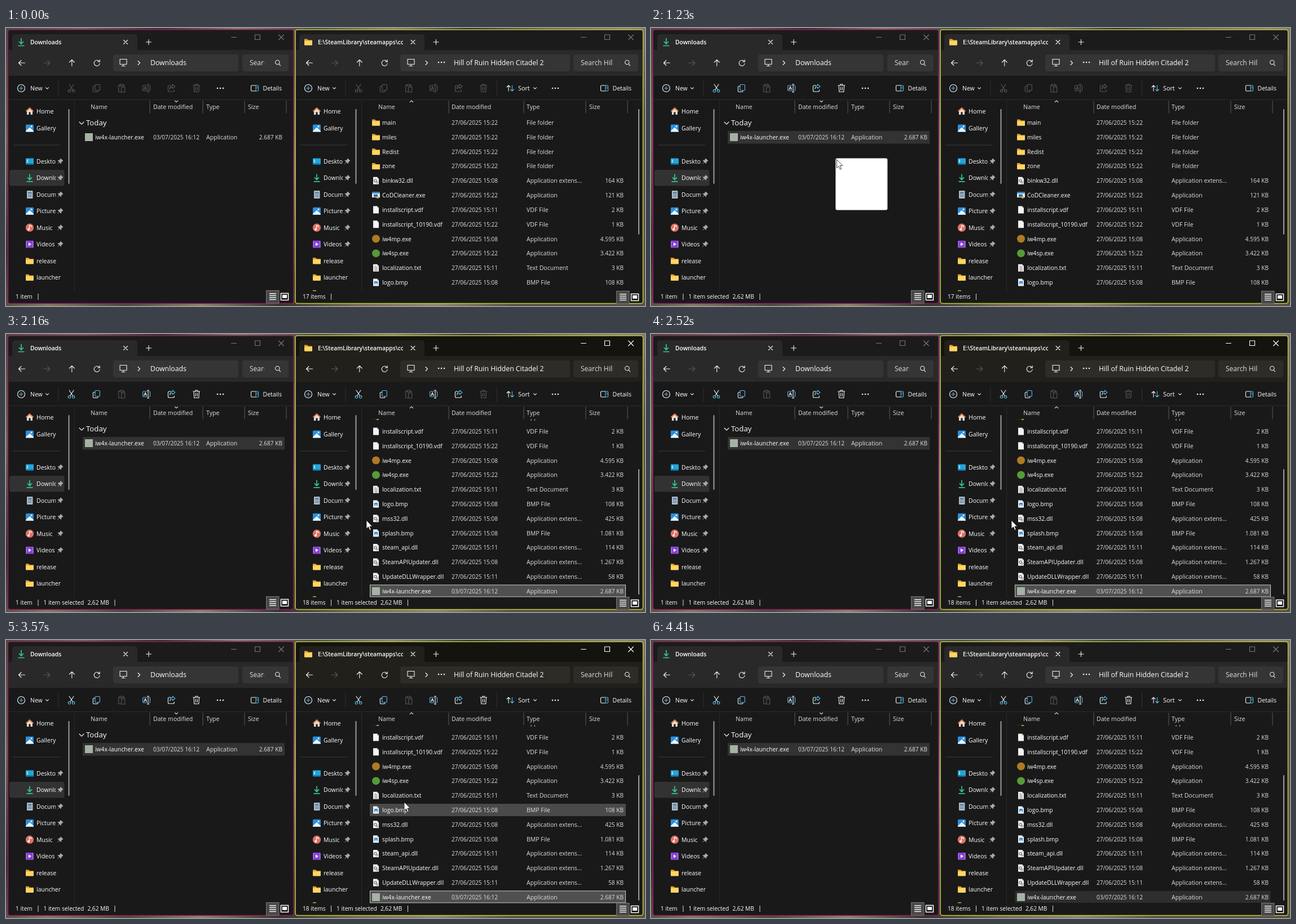
Recreate the animation shown at these times as an HTML page. Size 1133 by 494 pixels, loop 4.44 s.

```html
<!DOCTYPE html>
<html lang="en">
<head>
<meta charset="utf-8">
<title>Copying a file between folders</title>
<style>
html, body { margin: 0; width: 100%; height: 100%; overflow: hidden; background: #191919; }
svg { display: block; }
#stage { position: absolute; left: 0; top: 0; }
text { font-family: "Open Sans", "Noto Sans", sans-serif; fill: #fff; white-space: pre; }
.soft { fill: #dedede; }
.line { fill: none; stroke: #f4f4f4; stroke-width: 1.1; stroke-linecap: round; stroke-linejoin: round; }
.line .b { stroke: #58bdea; }
.off, .off .b { stroke: #56595b; }
.title { fill: #1c1b1b; }
.nav { fill: #2a2929; }
.caps { stroke: #777; }
.focused .title { fill: #15130d; }
.focused .nav { fill: #22201a; }
.focused .caps { stroke: #fff; }
</style>
</head>
<body>
<svg id="stage" width="1133" height="494" viewBox="0 0 1133 494"></svg>
<script>
const LOOP = 4440, DROP = 2010, BLUR = 4080, SCROLL = 150, ROW = 25.82;
const FOLDER = 'Hill of Ruin Hidden Citadel 2';
const stage = document.getElementById('stage');

// Drawing helpers
const text = (x, y, s, size = 10.5, attrs = '') =>
  `<text x="${x}" y="${y}" font-size="${size}" ${attrs}>${s}</text>`;
const soft = (x, y, s, size, attrs = '') => text(x, y, s, size, `class="soft" ${attrs}`);
const cropped = (x, y, s, size, w, attrs = '') =>
  `<svg x="${x}" y="${y - 14}" width="${w}" height="20">${text(0, 14, s, size, attrs)}</svg>`;
const rect = (x, y, w, h, fill, attrs = '') =>
  `<rect x="${x}" y="${y}" width="${w}" height="${h}" fill="${fill}" ${attrs}/>`;
const at = (x, y, body, attrs = '') => `<g transform="translate(${x} ${y})" ${attrs}>${body}</g>`;
const path = (d, attrs = '') => `<path d="${d}" ${attrs}/>`;
const line = (x, y, d, attrs = 'class="line"') => at(x, y, path(d), attrs);
const dots = (x, y) => [-5, 0, 5].map(d => `<circle cx="${x + d}" cy="${y}" r="1.3" fill="#eee"/>`).join('');

const glyph = {
  back: 'M5.5 0H-5.5M-1-4.5-5.5 0-1 4.5',
  forward: 'M-5.5 0H5.5M1-4.5 5.5 0 1 4.5',
  up: 'M0 5.5V-5.5M-4.5-1 0-5.5 4.5-1',
  refresh: 'M4.5-2A5 5 0 1 0 5 1M5-5.5V-2H1.5',
  pc: 'M-6-5.5H6V3.5H-6ZM-3 6.5H3M0 3.5V6.5',
  right: 'M-2-3.5 1.5 0-2 3.5',
  down: 'M-2.5-1.2 0 1.2 2.5-1.2',
  lens: 'M3.5-1A3.7 3.7 0 1 1-3.9-1 3.7 3.7 0 1 1 3.5-1M2.5 2 5 4.8',
  cross: 'M-3.5-3.5 3.5 3.5M3.5-3.5-3.5 3.5',
  plus: 'M-4.5 0H4.5M0-4.5V4.5'
};

const blue = d => path(d, 'class="b"');
const ring = (x, y, r) => `<circle class="b" cx="${x}" cy="${y}" r="${r}"/>`;
const tools = {
  cut: path('M-4-7 2.5 3M4-7-2.5 3') + ring(-3.6, 4.8, 2.2) + ring(3.6, 4.8, 2.2),
  copy: path('M-2.5-3.5H-4.5Q-6-3.5-6-2V5Q-6 6.5-4.5 6.5H1Q2.5 6.5 2.5 5V4') + blue('M-1-6.5H4.5Q6-6.5 6-5V2.5Q6 4 4.5 4H-1Q-2.5 4-2.5 2.5V-5Q-2.5-6.5-1-6.5Z'),
  paste: path('M-2.5-5.5H-5V6.5H-1M2.5-5.5H5V-3M-2.5-7H2.5V-4H-2.5Z') + blue('M0-2H6V7H0Z'),
  rename: blue('M1-5H-5Q-6.5-5-6.5-3.5V3Q-6.5 4.5-5 4.5H1M5 4.5Q6.5 4.5 6.5 3V-3.5Q6.5-5 5-5') + path('M3-7V7M1.5-7H4.5M1.5 7H4.5M-4.5 2.5-2-3 .5 2.5M-3.7 1H-.4'),
  share: path('M-1-5H-4Q-6-5-6-3V4Q-6 6-4 6H3Q5 6 5 4V3') + blue('M2-7 6.5-3.2 2 .5V-1.8Q-1.5-2-3 1.5-2.5-4.5 2-4.8Z'),
  trash: path('M-6-5H6M-4.8-5-4 6.5H4L4.8-5M-2-5V-7H2V-5M-1.5-2V3.5M1.5-2V3.5')
};
const tool = (id, name, x) => at(x, 107, tools[name], `class="line off" id="${id}${name}"`);

// Coloured icons, centred on the origin
const folderIcon = path('M-7-5.5H-2L0-3.5H7V5H-7Z', 'fill="#e2a32b"') + rect(-7, -2.5, 14, 8.3, '#ffd563', 'rx="1"');
const sheet = path('M-5-6.5H2L5-3.5V6.5H-5Z', 'fill="#f3f3f3"') + path('M2-6.5V-3.5H5Z', 'fill="#b9b9b9"');
const icons = {
  folder: folderIcon,
  page: sheet,
  lib: sheet + '<circle cx="-1" cy="0" r="2.2" fill="none" stroke="#777" stroke-width="1.3"/><circle cx="2" cy="3" r="1.6" fill="none" stroke="#777"/>',
  txt: sheet + path('M-3-3H1M-3-1H3M-3 1H3M-3 3H3M-3 5H3', 'stroke="#888" stroke-width=".9"'),
  bmp: sheet + rect(-3, -2, 6, 6, '#2f86d0') + path('M-3 4 0 0 3 4Z', 'fill="#bfe2fa"'),
  app: rect(-7, -5.5, 14, 9.5, '#e6eef5') + rect(-7, -5.5, 14, 2.5, '#3b87c8') + rect(-4, -1.5, 7, 4.5, '#2c6daa') + rect(1, 2, 4, 3.5, '#d8b53c'),
  amber: '<circle r="7" fill="#b07a24"/>',
  green: '<circle r="7" fill="#569a38"/>',
  launcher: rect(-7, -7, 14, 14, '#a5b2a5'),
  home: path('M-5-1V6H-1.5V1.5H1.5V6H5V-1L0-5Z', 'fill="#e3ddd8"') + path('M-6.5 0 0-6 6.5 0', 'fill="none" stroke="#e0733f" stroke-width="2"'),
  picture: rect(-7, -6.5, 14, 13, '#2b8fdb', 'rx="1.5"') + path('M-7 5 0-1.5 7 5V6.5H-7Z', 'fill="#e9f5ff"') + '<circle cx="3" cy="-3" r="1.4" fill="#fff"/>',
  desktop: rect(-7, -5.5, 14, 11, '#23a5d8', 'rx="1"') + rect(-5, -3, 2, 2, '#d5f4ff') + rect(-5, 0, 2, 2, '#d5f4ff') + rect(-7, 3.5, 14, 2, '#1476ad'),
  download: path('M0-7V3M-4-1 0 3.2 4-1M-5.5 6.5H5.5', 'fill="none" stroke="#35c596" stroke-width="1.7"'),
  doc: rect(-5, -7, 10.5, 14, '#a9bccb', 'rx="1"') + rect(-3, -4.5, 6.5, 3, '#5c7f9c') + path('M-3 1H3.5M-3 3.5H3.5', 'stroke="#4f6f8b"'),
  music: '<circle r="7.2" fill="#df7162"/>' + path('M-.5 3V-4L3-3V-1', 'fill="none" stroke="#fff" stroke-width="1.3"') + '<circle cx="-2" cy="3" r="1.9" fill="#fff"/>',
  video: rect(-7, -6.5, 14, 13, '#8543d0', 'rx="1.5"') + path('M-2-3 3 0-2 3Z', 'fill="#fff"') + path('M-5.5-5V5M5.5-5V5', 'stroke="#d6b7f7" stroke-dasharray="1.5 1.5"')
};
const icon = (name, x, y) => at(x, y, icons[name]);
const pin = y => at(96, y, path('M1-5 5-1 3.8-.5 1.8 1.5 1.5 4-4-1.5-1.5-1.8.5-3.8ZM-1 1-4.5 4.5', 'fill="#aaa" stroke="#aaa" stroke-width=".9"'));

function sidebar(selected) {
  const items = [['desktop', 'Desktop'], ['download', 'Downloads'], ['doc', 'Documents'], ['picture', 'Pictures'],
    ['music', 'Music'], ['video', 'Videos'], ['folder', 'release'], ['folder', 'launcher']];
  let out = selected ? rect(6, 252, 97.5, 28.5, '#323232', 'rx="3"') : '';
  out += icon('home', 42, 148) + text(54, 152, 'Home', 10.8) + icon('picture', 42, 178) + text(54, 182, 'Gallery');
  out += rect(13, 207.5, 83, 1, '#3d3d3d');
  items.forEach(([kind, label], i) => {
    const y = 237 + i * 29.45, pinned = i < 6;
    out += icon(kind, 42, y) + cropped(54, y + 4, label, 10.5, pinned ? 34.5 : 50) + (pinned ? pin(y) : '');
  });
  return out + rect(110.5, 144, 2, 133, '#9b9b9b', 'rx="1"') + rect(121, 128, 1, 340, '#292929');
}

function status(id, x, countWidth, count) {
  const s = x + countWidth + 10;
  return text(x, 481, count, 10.2, `id="${id}count"`) + rect(s, 472, 1, 11, '#ddd') +
    `<g id="${id}picked">${text(s + 10, 481, '1 item selected', 10.2)}${text(s + 88, 481, '2,62 MB', 10.2)}${rect(s + 136, 472, 1, 11, '#ddd')}</g>`;
}
const views = (x, y) => rect(x - 11.5, y - 11, 22.5, 22.5, '#484848', 'stroke="#777"') +
  at(x, y, path('M-6-5.5H6M-6-2H6M-6 1.5H6M-6 5H6', 'stroke="#f4f4f4" stroke-width="1.3"')) +
  at(x + 21, y, rect(-6.5, -6, 13, 12, '#111', 'stroke="#fff" stroke-width="1.5"') + rect(-4, -3.5, 8, 6, '#fff'));

function frame(id, w) {
  const { x, width, dx, border, tabX, tabW, addr, addrW, search, searchW, capX, detail } = w, nx = dx ? dx + 1 : 0;
  let out = rect(x, 3, width, 486.5, '#191919', `rx="4" stroke="${border}" stroke-width="1.6"`);
  out += rect(x + 1, 4, width - 2, 36, '', 'rx="3" class="title"') + rect(x + 1, 39, width - 2, 46, '', 'class="nav"');
  out += path(`M${tabX} 39V17Q${tabX} 11 ${tabX + 6} 11H${tabX + tabW - 6}Q${tabX + tabW} 11 ${tabX + tabW} 17V39Z`, 'class="nav"');
  out += line(w.closeX, 25, glyph.cross) + line(w.closeX + 41, 25, glyph.plus);
  out += at(capX, 16.5, path('M-4.5 0H4.5M37.5-4.5H46.5V4H37.5ZM79.5-4.5 88.5 4.5M88.5-4.5 79.5 4.5'), 'class="line caps"');
  out += ['back', 'forward', 'up', 'refresh'].map((n, i) =>
    line(nx + 28 + i * 44.4, 62, glyph[n], `class="line${i === 1 ? ' off' : ''}"`)).join('');
  const field = 'rx="4" fill-opacity=".055"';
  out += rect(addr, 47, addrW, 30, '#fff', field) + rect(search, 47, searchW, 30, '#fff', field);
  out += line(nx + 208, 61, glyph.pc) + line(nx + 236, 62, glyph.right) + line(search + searchW - 19.5, 62, glyph.lens);
  out += at(dx + 27, 107, '<circle r="6.5"/>' + blue('M-3.2 0H3.2M0-3.2V3.2'), 'class="line"');
  out += text(dx + 43, 111, 'New') + line(dx + 73, 107, glyph.down) + rect(dx + 92.5, 94, 1, 26, '#303030');
  out += Object.keys(tools).map((n, i) => tool(id, n, dx + 116 + i * 44.35)).join('');
  out += at(detail, 107, path('M1.5-5H-5Q-6.5-5-6.5-3.5V3.5Q-6.5 5-5 5H1.5') + blue('M2-5H5Q6.5-5 6.5-3.5V3.5Q6.5 5 5 5H2ZM3.8-2H4.8M3.8 0H4.8'), 'class="line"');
  out += text(detail + 14.5, 111, 'Details') + rect(x + 1, 127, width - 2, 1, '#2c2c2c');
  return `<g id="${id}">${out}${at(dx, 0, sidebar(!dx))}</g>`;
}
const columns = (labels, rules) =>
  labels.map(([x, s]) => soft(x, 144, s, 10.6)).join('') +
  rules.map(x => rect(x, 129, 1, 22.5, '#5a5a5a')).join('');

// Right-hand list
const LIB = 'Application extens...', APP = 'Application', DIR = 'File folder', VDF = 'VDF File';
const files = [
  ['folder', 'main', 22, DIR], ['folder', 'miles', 22, DIR], ['folder', 'Redist', 22, DIR], ['folder', 'zone', 22, DIR],
  ['lib', 'binkw32.dll', '08', LIB, '164'], ['app', 'CoDCleaner.exe', 22, APP, '121'],
  ['page', 'installscript.vdf', 11, VDF, '2'], ['page', 'installscript_10190.vdf', 22, VDF, '1'],
  ['amber', 'iw4mp.exe', '08', APP, '4.595'], ['green', 'iw4sp.exe', 22, APP, '3.422'],
  ['txt', 'localization.txt', 11, 'Text Document', '3'], ['bmp', 'logo.bmp', '08', 'BMP File', '108'],
  ['lib', 'mss32.dll', '08', LIB, '425'], ['bmp', 'splash.bmp', '08', 'BMP File', '1.081'],
  ['lib', 'steam_api.dll', 11, LIB, '114'], ['lib', 'SteamAPIUpdater.dll', '08', LIB, '1.267'],
  ['lib', 'UpdateDLLWrapper.dll', 11, LIB, '58'], ['launcher', 'iw4x-launcher.exe', 0, APP, '2.687']
];
const fileRow = ([kind, name, min, type, kb], i) => {
  const y = 168 + i * ROW, b = y + 4;
  return `<g id="file${i}">` + icon(kind, 656, y) + text(667, b, name, 10.3) +
    soft(790, b, min ? '27/06/2025 15:' + min : '03/07/2025 16:12', 10.1) + soft(923, b, type, 10.5) +
    (kb ? soft(1095, b, kb + ' KB', 10.1, 'text-anchor="end"') : '') + '</g>';
};

const stops = ['#4d483c', '#6e6553', '#35302a', '#857a64', '#4e483b', '#8f846c', '#38332c', '#75694f', '#918670', '#5a5043']
  .map((c, i) => `<stop offset="${i / 9}" stop-color="${c}"/>`).join('');

let scene = `<defs><linearGradient id="wall" x2="1" y2=".3">${stops}</linearGradient></defs>` + rect(0, 0, 1133, 494, 'url(#wall)');

scene += frame('left', { x: 3.5, width: 506.5, dx: 0, border: '#8b1d61', tabX: 11, tabW: 222, closeX: 212,
  addr: 190, addrW: 222, search: 419, searchW: 82, capX: 404, detail: 441 });
scene += icon('download', 27, 25) + text(43, 29, 'Downloads', 10.3, 'font-weight="600"') + text(256, 66, 'Downloads', 12.25);
scene += cropped(432, 66, 'Search Downloads', 12, 25.5, 'class="soft"') + dots(380, 107);
scene += columns([[150, 'Name'], [261, 'Date modified'], [355, 'Type'], [429, 'Size']], [254.5, 348.5, 422.5, 496.5]);
scene += line(302, 130.5, glyph.down) + line(134, 169, 'M-4-2 0 2 4-2') + text(142, 173, 'Today', 13.2);
scene += rect(136, 183, 358, 22.5, '#333', 'id="leftRow"') + icon('launcher', 147, 194) + text(158, 198, 'iw4x-launcher.exe', 10.3);
scene += soft(261, 198, '03/07/2025 16:12', 10.1) + soft(355, 198, APP, 10.6) + soft(490, 198, '2.687 KB', 10.1, 'text-anchor="end"');
scene += status('left', 17, 29.5, '1 item') + views(473, 477.5);

scene += frame('right', { x: 513, width: 616.5, dx: 509, border: '#b7ca42', tabX: 520, tabW: 222, closeX: 721.5,
  addr: 699, addrW: 301, search: 1006, searchW: 115, capX: 1024, detail: 1061 });
scene += icon('folder', 536, 25) + cropped(553, 29, 'E:\\SteamLibrary\\steamapps\\common', 10.3, 151, 'font-weight="600"');
scene += dots(772, 61) + text(794, 66, FOLDER, 12.25) + cropped(1019, 66, 'Search Hill', 12, 57, 'class="soft"');
scene += rect(870, 94, 1, 26, '#303030') + at(894, 107, path('M-3 5V-5M-6-2-3-5 0-2') + blue('M3.5-5V5M.5 2 3.5 5 6.5 2'), 'class="line"');
scene += text(908, 111, 'Sort', 10.8) + line(938, 107, glyph.down) + dots(974, 107);
scene += columns([[660, 'Name'], [790, 'Date modified'], [923, 'Type'], [1034, 'Size']], [784.5, 917.5, 1027.5, 1101.5]);
scene += line(719, 130.5, 'M-2.8 1.2 0-1.3 2.8 1.2') + rect(544, 466, 6, 1.5, '#e2a32b');
scene += `<svg x="636" y="151" width="480" height="317" viewBox="636 151 480 317"><g id="list">` +
  rect(645, 0, 454, 22, '#4a4a4a', 'id="hover"') +
  rect(645.5, 168 + 17 * ROW - 11, 453, 21, '#505050', 'id="newRow"') + files.map(fileRow).join('') + '</g></svg>';
scene += rect(1121, 144, 2, 223, '#9b9b9b', 'rx="1" id="thumb"');
scene += status('right', 526, 40, '17 items') + views(1094, 478.5);

scene += `<g id="drag">${rect(-2, -2, 92, 92, '#fff', 'rx="3"')}<g id="tip">` +
  rect(10, 12, 214, 17.5, '#fbfbfb', 'rx="2" stroke="#bbb" stroke-width=".8"') +
  path('M15 21H23M19 17V25', 'stroke="#222" stroke-width="1.2"') +
  text(29, 25, 'Copy to', 10.4, 'style="fill:#2f4cae"') + text(71, 25, FOLDER, 10.35, 'style="fill:#191b58"') + '</g></g>';
scene += `<g id="cursor">${path('M0 0V15L3.5 11.8 6 17.5 8.3 16.5 5.9 11H10.5Z', 'fill="#fff" stroke="#111" stroke-width=".8"')}</g>`;
stage.innerHTML = scene;

// Motion
const $ = id => document.getElementById(id);
const show = (id, on) => $(id).setAttribute('display', on ? 'inline' : 'none');
const set = (id, key, value) => $(id).setAttribute(key, value);
const keys = [[450, 300, 496], [810, 216, 211], [930, 205, 195], [1050, 205, 195], [1560, 640, 330],
  [1620, 644, 333], [1800, 639, 331], [3390, 639, 331], [3570, 706, 288], [4110, 1136, 12]];

function pointer(t) {
  const i = keys.findIndex(k => k[0] > t);
  if (i < 1) return null;
  const [a, b] = [keys[i - 1], keys[i]], u = (t - a[0]) / (b[0] - a[0]), e = u * u * (3 - 2 * u);
  return [a[1] + (b[1] - a[1]) * e, a[2] + (b[2] - a[2]) * e];
}

function render(t) {
  const p = pointer(t), late = pointer(t - 30);
  const picked = t >= 1020, dropped = t >= DROP, focused = dropped && t < BLUR;
  const dragging = t >= 1080 && !dropped;
  const over = late && late[0] < 494 && late[1] > 183 && late[1] < 206;

  show('leftRow', picked || over);
  set('leftRow', 'fill', picked ? '#333' : '#2b2b2b');
  show('leftpicked', picked);
  show('rightpicked', dropped);
  $('rightcount').textContent = dropped ? '18 items' : '17 items';
  for (const name in tools) {
    const on = name !== 'paste';
    $('left' + name).classList.toggle('off', !(picked && on));
    $('right' + name).classList.toggle('off', !(dropped && on && (name !== 'trash' || t >= 2700)));
  }
  $('right').classList.toggle('focused', focused);

  set('list', 'transform', `translate(0 ${dropped ? -SCROLL : 0})`);
  set('thumb', 'y', dropped ? 240 : 144);
  show('file17', dropped);
  show('newRow', dropped);
  set('newRow', 'fill', focused ? '#505050' : '#2e2e2e');
  set('newRow', 'stroke', focused ? '#c8c8c8' : 'none');

  const row = late && dropped && late[0] > 645 && late[0] < 1099 && late[1] > 152
    ? Math.round((late[1] + SCROLL - 168) / ROW) : -1;
  show('hover', row >= 0 && row < 17);
  set('hover', 'y', 157 + row * ROW);

  show('cursor', p);
  show('drag', p && dragging);
  if (p) {
    const place = `translate(${p[0].toFixed(1)} ${p[1].toFixed(1)})`;
    set('cursor', 'transform', place);
    set('drag', 'transform', place);
    show('tip', dragging && p[0] > 632);
  }
}

const start = performance.now();
function tick() {
  const t = (performance.now() - start) % LOOP;
  render(t - t % 30);
  requestAnimationFrame(tick);
}
tick();
</script>
</body>
</html>
```
